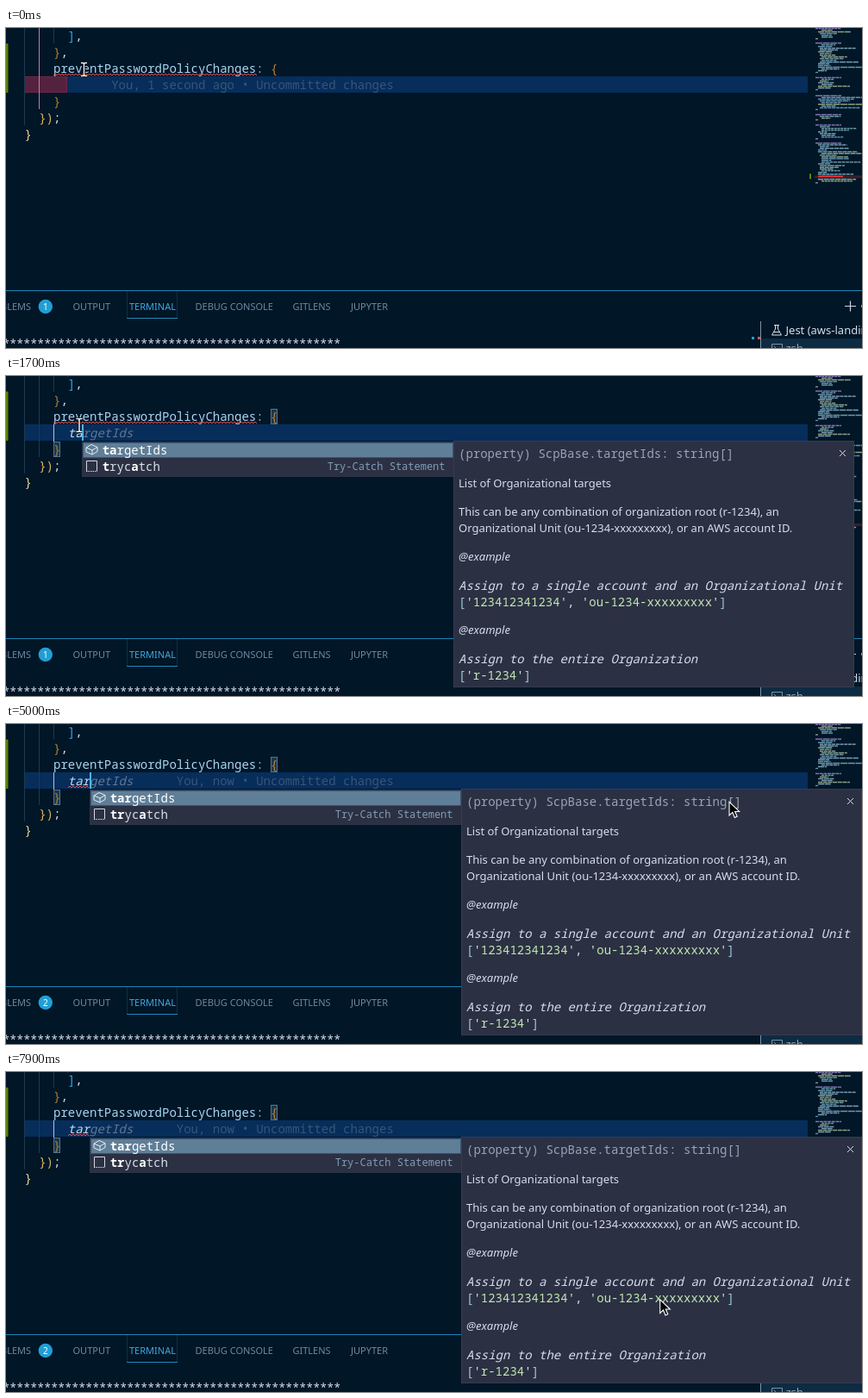
An HTML page that plays this animation: 993 by 371 pixels, repeating every 8 s.

```html
<!DOCTYPE html>
<html lang="en">
<head>
<meta charset="utf-8">
<title>Code completion</title>
<style>
html, body { margin: 0; width: 100%; height: 100%; overflow: hidden; background: #011627; }
svg { display: block; width: 993px; height: 371px; }
text { white-space: pre; }
.mono { font: 14px "Noto Sans Mono", monospace; }
.ui { font: 13px "Noto Sans", sans-serif; }
.tab { font: 11px "Noto Sans", sans-serif; }
.it { font-style: italic; }
.b { font-weight: 700; fill: #fff; }
</style>
</head>
<body>
<svg id="stage" viewBox="0 0 993 371"></svg>
<script>
const LOOP = 8000, STEP = 100, CW = 8.4, X0 = 21.4;
const stage = document.getElementById('stage');
const timed = [];

function add(parent, tag, attrs, text) {
  const e = document.createElementNS('http://www.w3.org/2000/svg', tag);
  for (const k in attrs) e.setAttribute(k, attrs[k]);
  if (text !== undefined) e.textContent = text;
  parent.appendChild(e);
  return e;
}
const group = (parent = stage) => add(parent, 'g', {});
const rect = (p, x, y, width, height, fill, more) => add(p, 'rect', { x, y, width, height, fill, ...more });
const path = (p, d, stroke, more) => add(p, 'path', { d, stroke, fill: 'none', ...more });

// parts: a string, or a list of [string, fill, class]
function label(p, x, y, cls, fill, parts, more) {
  const t = add(p, 'text', { x, y, class: cls, fill, ...more });
  if (typeof parts === 'string') t.textContent = parts;
  else for (const [s, f, c] of parts) add(t, 'tspan', { ...(f && { fill: f }), ...(c && { class: c }) }, s);
  return t;
}
const code = (p, col, row, parts, fill = '#d6deeb', cls = '') =>
  label(p, X0 + col * CW, 14 + row * 19, 'mono ' + cls, fill, parts);

// spans: [from, to, opacity]
function during(e, ...spans) { timed.push([e, spans]); return e; }

function squiggle(p, x, y, w) {
  let d = `M${x} ${y + 2}`;
  for (let i = 2; i <= w; i += 2) d += `L${x + i} ${y + (i % 4 ? 0 : 2)}`;
  return path(p, d, '#e5504c', { 'stroke-width': 1 });
}

function editor() {
  rect(stage, 21, 56, 909, 19, '#072d5b');
  rect(stage, 0, 18, 2.5, 57, '#5a8408');
  during(rect(stage, 21.5, 56.5, 49, 18, '#56213f', { stroke: '#6d2748' }), [0, 1500]);

  path(stage, 'M21.5 0V113M38.5 0V94M55.5 0V18M55.5 56V75M71.5 0V1', '#1d3a51');
  during(path(stage, 'M38.5 0V94', '#b27fd0'), [0, 1500]);
  during(path(stage, 'M55.5 56V76', '#a9c7dc'), [1500, LOOP]);

  const boxes = during(group(), [500, LOOP]);
  for (const [x, y] of [[307, 38], [55, 76]])
    rect(boxes, x + .5, y + .5, 7, 17, '#17384f', { stroke: '#56748c' });

  code(stage, 6, 0, [[']', '#2fa8e6'], [',']]);
  code(stage, 4, 1, [['}', '#b37d2f'], [',']]);
  code(stage, 4, 2, [['preventPasswordPolicyChanges', '#a9d6f2'], [': ', '#8fb8c9'], ['{', '#c08136']]);
  code(stage, 4, 4, '}', '#b37d2f');
  code(stage, 2, 5, [['}', '#e3b55c'], [')', '#d8b45a'], [';']]);
  code(stage, 0, 6, '}', '#e2d9a0');
  during(squiggle(stage, 55, 53, 236), [0, 2300]);

  const blame = '#365677';
  during(code(stage, 12, 3, 'You, 1 second ago • Uncommitted changes', blame), [0, 1500]);
  during(code(stage, 21, 3, 'You, now • Uncommitted changes', blame), [3500, LOOP]);

  const word = 'targetIds';
  const typing = [[1500, 1600, 1, 1], [1600, 1700, 1], [1700, 1900, 2], [1900, LOOP, 3]];
  for (const [from, to, n, plain] of typing) {
    const parts = [[word.slice(0, n), '#c3def0']];
    if (!plain) parts.push([word.slice(n), '#64788f']);
    during(code(stage, 6, 3, parts, '', 'it'), [from, to]);
  }
  during(squiggle(stage, 72, 72, 25), [2300, LOOP]);

  const caret = (col, ...spans) =>
    during(rect(stage, Math.floor(X0 + col * CW), 56, 2, 19, '#4fb4e6'), ...spans);
  caret(6, [500, 1000]);
  caret(7, [1500, 1700]);
  caret(8, [1700, 1900]);
  caret(9, [1900, 2400], ...[3, 4, 5, 6, 7].map(s => [s * 1000, s * 1000 + 500]));
}

function minimap() {
  let seed = 7;
  const rnd = () => (seed = seed * 16807 % 2147483647) / 2147483647;
  const blocks = [[0, 13], [17, 52], [57, 73], [78, 95], [100, 108], [112, 130], [133, 180]];
  const tones = ['#8fb6cc', '#6fa8c8', '#a9b894', '#7fb0bd'];
  for (const [top, end] of blocks) {
    for (let y = top; y < end; y += 2) {
      const first = y === top, last = y + 2 >= end;
      const x = first || last ? 939 : 942 + Math.floor(rnd() * 3) * 2;
      const w = last ? 3 : first ? 30 : 10 + rnd() * rnd() * 50;
      path(stage, `M${x} ${y + .5}h${Math.min(w, 993 - x)}`, first ? '#9a86cc' : tones[Math.floor(rnd() * 4)],
        { 'stroke-dasharray': `${3 + Math.floor(rnd() * 6)} .7`, 'stroke-width': 1.3, opacity: .85 });
    }
  }
  rect(stage, 938, 171, 55, 3, '#3d1c2c');
  rect(stage, 942, 171, 29, 2, '#d42f36');
  rect(stage, 932, 169, 2, 6, '#5a8408');
}

function panel() {
  rect(stage, 0, 304, 993, 1, '#1b84b4');
  const tabs = [[-28, 'PROBLEMS'], [77.5, 'OUTPUT'], [143, 'TERMINAL'], [219.5, 'DEBUG CONSOLE'], [332.5, 'GITLENS'], [400, 'JUPYTER']];
  for (const [x, s] of tabs) label(stage, x, 327, 'tab', s === 'TERMINAL' ? '#3fa9dd' : '#6d899f', s);
  path(stage, 'M140.5 305V336M198.5 305V336', '#0c2f47');
  path(stage, 'M140 336.5H199', '#2386b5');
  add(stage, 'circle', { cx: 45.8, cy: 323, r: 8.2, fill: '#219fd5' });
  const badge = s => label(stage, 45.8, 326.5, 'tab', '#fff', s, { 'text-anchor': 'middle', style: 'font-size:10px' });
  during(badge('1'), [0, 2400]);
  during(badge('2'), [2400, LOOP]);

  label(stage, -4, 371, 'mono', '#d6deeb', '*'.repeat(49), { style: 'letter-spacing:-.4px' });
  rect(stage, 865, 358, 3, 3, '#219fd5');
  rect(stage, 872, 358, 3, 3, '#e0524d');
  rect(stage, 876, 360, 117, 11, '#0d2b42');
  path(stage, 'M875.5 340V371', '#7d93a3');
  path(stage, 'M979.5 316.5V328.5M973 322.5H986', '#c8d6e2', { 'stroke-width': 1.2 });
  rect(stage, 992, 321, 1, 3, '#8197a8');
  path(stage, 'M891 344.5H897M892.5 344.5V349L888.5 356H899.5L895.5 349V344.5M890.5 352.5H897.5', '#d6deeb');
  label(stage, 904.5, 355, 'ui', '#d6deeb', 'Jest (aws-landing');
  path(stage, 'M888.5 371V366.5H900.5V371M890.5 368.5L893 371', '#7d93a5');
  label(stage, 904.5, 375.5, 'ui', '#8fa3b3', 'zsh');
}

function hover() {
  const g = during(group(), [1200, 1300, .5], [1300, 1500]);
  rect(g, 71.5, -1, 388, 56.5, '#2c3043', { stroke: '#3c4257' });
  label(g, 80, 14, 'ui', '#d6deeb', 'You, 1 second ago');
  path(g, 'M72 24.5H459', '#454b60');
  label(g, 80, 45, 'ui', '#d6deeb', 'Uncommitted changes');
}

function cube(p, x, y) {
  path(p, `M${x} ${y + 4}l6 -3.5l7 3l-6 3.5zv5l7 3l6 -3.5v-5M${x + 7} ${y + 7}v5`, '#e4edf4', { 'stroke-linejoin': 'round' });
}

// items: [parts, detail]
function suggest(x, items, span) {
  const g = during(group(), span), h = items.length * 19;
  rect(g, x - .5, 76.5, 431, h + 2, '#2c3043', { stroke: '#2f3548' });
  rect(g, x, 77, 430, 18, '#5f7e97');
  rect(g, x + .5, 77.5, 429, 17, 'none', { stroke: '#122d42', 'stroke-dasharray': '1 1' });
  items.forEach(([parts, detail], i) => {
    const y = 91 + i * 19;
    if (i) {
      path(g, `M${x + 4.5} ${y}v-11.5h12v11.5`, '#cfd9e4');
      path(g, `M${x + 4} ${y + .5}h13`, '#cfd9e4', { 'stroke-dasharray': '1.5 1' });
    } else cube(g, x + 4, y - 12);
    label(g, x + 22.7, y, 'mono', i ? '#d6deeb' : '#fff', parts);
    label(g, x + 420.5, y - 1, 'mono', '#7f9db5', detail, { 'text-anchor': 'end', style: 'font-size:12px' });
  });
}

function details(x, span) {
  const g = during(group(), span), l = x + 6, text = '#d6deeb';
  rect(g, x + .5, 75.5, 464, 285, '#2c3043', { stroke: '#363c50' });
  label(g, l, 95, 'mono', '#98a4b5', '(property) ScpBase.targetIds: string[]');
  path(g, `M${x + 448} 86l7 7m0 -7l-7 7`, text);
  const line = (y, cls, s) => label(g, l, y, cls, text, s);
  const list = (y, ...strings) => {
    const parts = [['[', '#9cc9dd']];
    strings.forEach((s, i) => {
      if (i) parts.push([', ']);
      parts.push(["'", '#d9f5dd'], [s, '#bfe6b0'], ["'", '#d9f5dd']);
    });
    line(y, 'mono', [...parts, [']', '#9cc9dd']]);
  };
  line(129, 'ui', 'List of Organizational targets');
  line(162, 'ui', 'This can be any combination of organization root (r-1234), an');
  line(181, 'ui', 'Organizational Unit (ou-1234-xxxxxxxxx), or an AWS account ID.');
  line(214, 'ui it', '@example');
  line(248, 'mono it', 'Assign to a single account and an Organizational Unit');
  list(267, '123412341234', 'ou-1234-xxxxxxxxx');
  line(299, 'ui it', '@example');
  line(333, 'mono it', 'Assign to the entire Organization');
  list(352, 'r-1234');
}

function popups() {
  const b = s => [s, '#fff', 'b'];
  const tryNote = 'Try-Catch Statement';
  suggest(81, [
    [[b('t'), ['argetIds']], ''],
    [[b('t'), ['hrow']], 'Throw Exception'],
    [[b('t'), ['rycatch']], tryNote]
  ], [1600, 1700]);
  suggest(89, [
    [[b('ta'), ['rgetIds']], ''],
    [[b('t'), ['ryc'], b('a'), ['tch']], tryNote]
  ], [1700, 1900]);
  suggest(98, [
    [[b('tar'), ['getIds']], ''],
    [[b('tr'), ['yc'], b('a'), ['tch']], tryNote]
  ], [1900, LOOP]);
  details(519, [1700, 1900]);
  details(528, [1900, LOOP]);
}

// time, x, y of the pointer's hot spot
const track = [
  [0, 90.5, 48], [100, 88, 62], [200, 85, 75], [700, 85, 75], [800, 85, 66], [900, 85, 56], [1000, 85, 57],
  [3300, 85, 57], [3400, 130, 42], [3500, 260, 40], [3700, 560, 122], [3800, 610, 127], [4000, 660, 95],
  [4200, 713, 93], [5100, 854, 89], [5200, 855, 90], [5300, 855, 90], [5700, 815, 98], [6000, 791, 100],
  [6400, 791, 100], [6600, 735, 165], [6800, 610, 280], [6900, 570, 293], [7200, 575, 270],
  [7300, 575, 270], [7600, 685, 266], [7900, 758, 263]
];
function pointerAt(t) {
  let i = 0;
  while (i < track.length - 2 && t >= track[i + 1][0]) i++;
  const [t0, x0, y0] = track[i], [t1, x1, y1] = track[i + 1];
  const k = Math.min(1, (t - t0) / (t1 - t0));
  return [x0 + (x1 - x0) * k, y0 + (y1 - y0) * k];
}

editor();
minimap();
panel();
hover();
popups();

const pointer = group();
const beam = during(group(pointer), [0, 3600]);
const beamShape = 'M-3.5 -7.5H-1L0 -6.5L1 -7.5H3.5M0 -6.5V6.5M-3.5 7.5H-1L0 6.5L1 7.5H3.5';
path(beam, beamShape, '#000', { 'stroke-width': 3 });
path(beam, beamShape, '#fff', { 'stroke-width': 1.4 });
const arrow = during(group(pointer), [3600, LOOP]);
path(arrow, 'M.7 .8V16.5L4.5 13L7 19L9.8 17.8L7.3 12H12.3Z', '#fff', { fill: '#000', 'stroke-width': 1.1 });

function draw(now) {
  const t = Math.floor(now % LOOP / STEP) * STEP;
  for (const [e, spans] of timed) {
    const on = spans.find(([from, to]) => t >= from && t < to);
    e.style.display = on ? '' : 'none';
    e.style.opacity = on && on[2] || 1;
  }
  const [x, y] = pointerAt(t);
  pointer.setAttribute('transform', `translate(${x} ${y})`);
}
const start = performance.now();
(function tick() {
  draw(performance.now() - start);
  requestAnimationFrame(tick);
})();
</script>
</body>
</html>
```
